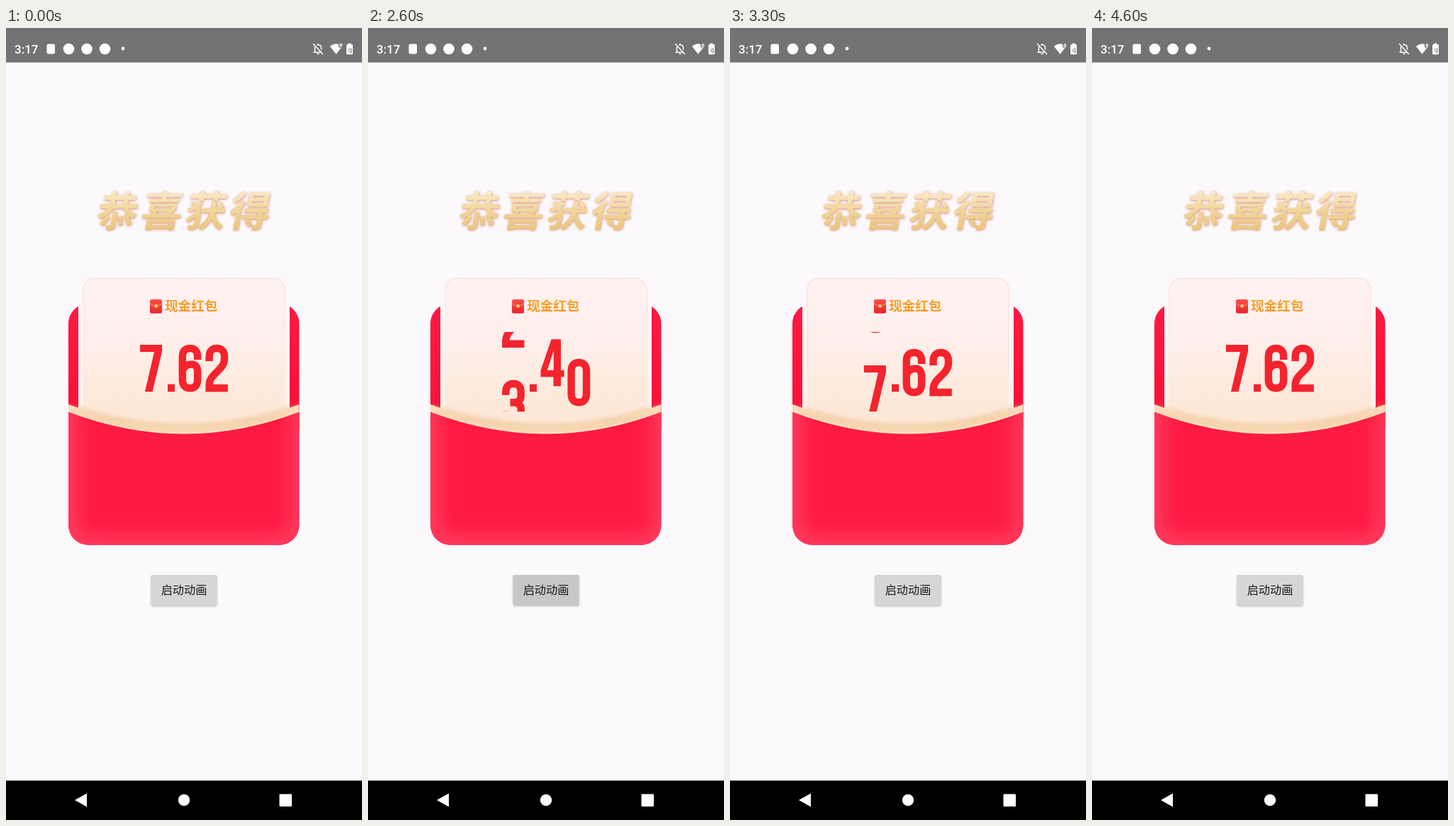
An HTML page with a canvas that plays this animation: 502x1115 px, repeating every 4700 ms.

```html
<!DOCTYPE html>
<html lang="zh">
<head>
<meta charset="utf-8">
<style>
html, body { margin: 0; width: 100%; height: 100%; overflow: hidden; background: #fbf9fb; }
canvas { display: block; }
</style>
</head>
<body>
<canvas id="stage" width="502" height="1115"></canvas>
<script>
const ctx = document.getElementById('stage').getContext('2d');
const LOOP = 4700, STEP = 100, ROLL_AT = 2250;
const CJK = '"Noto Sans CJK SC", "Noto Sans CJK", "Noto Sans CJK JP", sans-serif';
const RED = '#f4232e';

// Digit shapes in a 32 x 66 box
const LINES = {
  0: 'M5.3 17C5.3 9 9 5 16 5S26.7 9 26.7 17V49C26.7 57 23 61 16 61S5.3 57 5.3 49Z',
  1: 'M21.5 0V66M5 12.5H21',
  2: 'M5.3 23V17C5.3 9 9 5 16 5S26.7 9 26.7 17V20C26.7 36 5.3 40 5.3 57V61H31.5',
  3: 'M5.3 21V17C5.3 9 9 5 16 5S26.7 9 26.7 17V22C26.7 28 23 31.5 17 31.5H11.5M16 31.5C23 31.5 26.7 35 26.7 41V49C26.7 57 23 61 16 61S5.3 57 5.3 49V44',
  5: 'M30 5H7V36M8 33C10 29 13 27 17 27C24 27 26.7 31 26.7 38V49C26.7 57 23 61 16 61S5.3 57 5.3 49V46',
  6: 'M26.7 21V17C26.7 9 23 5 16 5S5.3 9 5.3 17V49C5.3 57 9 61 16 61S26.7 57 26.7 49V39C26.7 31 24 27.5 18 27.5C12 27.5 8 30 5.3 36',
  8: 'M16 31.5C9.5 31.5 6 28 6 22V16C6 9 9.5 5 16 5S26 9 26 16V22C26 28 22.5 31.5 16 31.5ZM16 31.5C9 31.5 5.3 36 5.3 42V50C5.3 57 9 61 16 61S26.7 57 26.7 50V42C26.7 36 23 31.5 16 31.5Z'
};
const SOLIDS = {
  4: 'M15 0H28.5V43.5H33V53H28.5V66H18V53H0V44ZM18.3 16V43.5H9.3Z',
  7: 'M0 0H31V9.5L17.5 66H7L20 10H0Z'
};
const toPaths = set => Object.fromEntries(Object.entries(set).map(([k, d]) => [k, new Path2D(d)]));
const lines = toPaths(LINES), solids = toPaths(SOLIDS);

// Each column rolls upward from its first digit; keys are [ms, rows travelled]
const ROW = 112;
const COLUMNS = [
  { x: 189, from: 2, keys: [[2400, 0], [2800, 1.6], [3300, 4.74], [3600, 5]] },
  { x: 243.5, from: 3, keys: [[2400, 0], [2800, 2.34], [3300, 2.946], [3600, 3]] },
  { x: 281.3, from: 8, keys: [[2250, 0], [2400, 0.3], [2800, 3.26], [3300, 3.946], [3600, 4]] }
];

// Monotone cubic through the keys, flat at both ends
function glide(keys, t) {
  const last = keys.length - 1;
  if (t <= keys[0][0]) return keys[0][1];
  if (t >= keys[last][0]) return keys[last][1];
  const slope = i => (keys[i + 1][1] - keys[i][1]) / (keys[i + 1][0] - keys[i][0]);
  const tangent = i => {
    if (i === 0 || i === last) return 0;
    const a = slope(i - 1), b = slope(i);
    return a * b > 0 ? 2 * a * b / (a + b) : 0;
  };
  let i = 0;
  while (t > keys[i + 1][0]) i++;
  const h = keys[i + 1][0] - keys[i][0], u = (t - keys[i][0]) / h;
  const s = u * u * (3 - 2 * u);
  return keys[i][1] * (1 - s) + keys[i + 1][1] * s
    + h * (tangent(i) * u * (1 - u) ** 2 - tangent(i + 1) * u * u * (1 - u));
}

function fade(y0, y1, ...colors) {
  const g = ctx.createLinearGradient(0, y0, 0, y1);
  colors.forEach((c, i) => g.addColorStop(i / (colors.length - 1), c));
  return g;
}

function rect(x, y, w, h, fill) {
  ctx.fillStyle = fill;
  ctx.fillRect(x, y, w, h);
}

function box(x, y, w, h, r, fill) {
  ctx.beginPath();
  ctx.roundRect(x, y, w, h, r);
  ctx.fillStyle = fill;
  ctx.fill();
}

function dot(x, y, r, fill) {
  ctx.beginPath();
  ctx.arc(x, y, r, 0, 7);
  ctx.fillStyle = fill;
  ctx.fill();
}

function shape(d, fill) {
  ctx.fillStyle = fill;
  ctx.fill(new Path2D(d));
}

function line(d, width, color) {
  ctx.lineWidth = width;
  ctx.strokeStyle = color;
  ctx.stroke(new Path2D(d));
}

function text(str, x, y, font, fill, align = 'left') {
  ctx.font = font;
  ctx.textAlign = align;
  ctx.fillStyle = fill;
  ctx.fillText(str, x, y);
}

function shadow(color, blur, dy) {
  ctx.shadowColor = color;
  ctx.shadowBlur = blur;
  ctx.shadowOffsetY = dy;
}

function statusBar(t) {
  const grey = '#757275';
  rect(0, 0, 502, 48.5, grey);
  text('3:17', 12, 35.5, '500 17px Roboto, sans-serif', '#fff');
  box(57.5, 22.5, 11.5, 14, 2, '#fff');
  [88.5, 114, 139.5].forEach(x => dot(x, 29.5, 7.8, '#fff'));
  dot(165, 29, 2.4, '#fff');
  line('M435.5 34V28Q435.5 23.8 440 23.8Q444.5 23.8 444.5 28V34M433.5 34.2H446.5M440 22V24M438.5 36.5H441.5', 1.5, '#fff');
  line('M434 21.5L448 36.5', 3, grey);
  line('M433 22L447 37', 1.5, '#fff');
  shape('M457 26Q465.5 18.5 474 26L465.5 36.8Z', '#fff');
  box(469, 20, 7, 7.5, 1, grey);
  if (t >= 2200) text('6', 470, 27, '700 8px Roboto, sans-serif', '#fff');
  else line('M470.5 22L474 26M474 22L470.5 26', 1.2, '#fff');
  box(482.5, 21.5, 4, 3, 0.5, '#fff');
  box(480, 23, 9, 14.2, 1.5, '#fff');
  line('M483.5 30.5Q483.5 34.5 487 34.5V29.5Q484 29 483.5 30.5', 1, grey);
}

function navBar() {
  rect(0, 1059.5, 502, 56, '#000');
  shape('M97 1087L114 1077.5V1096.5Z', '#fff');
  dot(251, 1087, 8.2, '#fff');
  box(385.5, 1078.5, 17.5, 17.5, 1, '#fff');
}

function title() {
  [...'恭喜获得'].forEach((ch, i) => {
    ctx.save();
    ctx.transform(1, 0, -0.17, 1, 158 + i * 62.2, 257);
    ctx.shadowOffsetX = 0.5;
    shadow('rgba(214,118,105,0.85)', 3.5, 1.5);
    text(ch, 0, 21.5, '900 58px ' + CJK, fade(-27, 27, '#f9e9c8', '#f0d698', '#e9c67a'), 'center');
    ctx.restore();
  });
}

function card() {
  box(88, 388, 325.5, 200, 28, fade(388, 550, '#ff1a43', '#f90f36'));
  rect(102, 386, 298, 180, fade(386, 560, '#fbf8fa', '#fdf2ec'));
  box(109, 352.5, 284, 220, 16, fade(352, 560, '#fef2f4', '#feeee8', '#fde6d3'));
  ctx.lineWidth = 1.5;
  ctx.strokeStyle = fade(352, 560, '#fde1d9', '#fdebdf');
  ctx.stroke();
  box(203, 382, 17, 19.8, 2.5, fade(382, 402, '#ff5148', '#e9222c'));
  line('M203 388Q211.5 395 220 388', 1, '#f9a468');
  dot(211.5, 391.5, 2.4, '#fbd27a');
  text('现金红包', 224, 398, '700 18.6px ' + CJK, fade(382, 402, '#f8a830', '#f5941a'));
}

function digit(n, x, y) {
  ctx.save();
  ctx.translate(x, y);
  if (n === 9) {
    ctx.translate(32, 66);
    ctx.rotate(Math.PI);
    n = 6;
  }
  if (solids[n]) {
    ctx.fillStyle = RED;
    ctx.fill(solids[n], 'evenodd');
  } else {
    ctx.lineWidth = 10.4;
    ctx.strokeStyle = RED;
    ctx.stroke(lines[n]);
  }
  ctx.restore();
}

function amount(t) {
  ctx.save();
  ctx.beginPath();
  ctx.rect(180, 428, 140, 112);
  ctx.clip();
  rect(228, 501.5, 10, 10.5, RED);
  for (const { x, from, keys } of COLUMNS) {
    const rows = glide(keys, t < ROLL_AT ? LOOP : t);
    const whole = Math.floor(rows), y = 446 - (rows - whole) * ROW;
    digit((from + whole) % 10, x, y);
    if (rows > whole) digit((from + whole + 1) % 10, x, y + ROW);
  }
  ctx.restore();
}

function pocket() {
  const body = 'M88 540.5Q251 602.5 413.5 540.5V700A28 28 0 0 1 385.5 728H116A28 28 0 0 1 88 700Z';
  ctx.save();
  ctx.beginPath();
  ctx.rect(88, 500, 325.5, 200);
  ctx.clip();
  shadow('rgba(222,170,120,0.45)', 6, -1);
  shape('M88 530Q251 588 413.5 530V542Q251 604 88 542Z', fade(530, 573, '#fbdfbd', '#f5d3ad', '#f8dab5'));
  shadow('transparent', 0, 0);
  line('M88 539.5Q251 601.5 413.5 539.5', 2, '#fae0bf');
  ctx.restore();

  ctx.save();
  shape(body, '#ff1a42');
  ctx.clip(new Path2D(body));
  // Soft glow cast inward by a stroke kept off stage
  ctx.shadowOffsetX = 1000;
  shadow('rgba(255,86,116,0.95)', 28, 0);
  ctx.translate(-1000, 0);
  line('M86 520V700A30 30 0 0 0 116 730H386A30 30 0 0 0 416 700V520', 17, '#fff');
  ctx.restore();
}

function button(t) {
  const pressed = t >= 2100 && t < 2300;
  const shade = t < 2200 ? 215 : Math.round(glide([[2200, 207], [2300, 196], [2400, 195], [2800, 208], [3000, 215]], t));
  ctx.save();
  shadow(pressed ? 'rgba(0,0,0,0.28)' : 'rgba(0,0,0,0.25)', pressed ? 6 : 3, pressed ? 3 : 1.5);
  box(204.5, 770, 93, 42.5, 2, `rgb(${shade},${shade - 1},${shade})`);
  ctx.restore();
  text('启动动画', 251, 797, '400 16.2px ' + CJK, '#1b1b1b', 'center');
}

function draw(now) {
  const t = Math.floor(now % LOOP / STEP) * STEP;
  rect(0, 0, 502, 1115, '#fbf9fb');
  statusBar(t);
  title();
  card();
  amount(t);
  pocket();
  button(t);
  navBar();
}

const start = performance.now();
function tick() {
  draw(performance.now() - start);
  requestAnimationFrame(tick);
}
tick();
</script>
</body>
</html>
```
